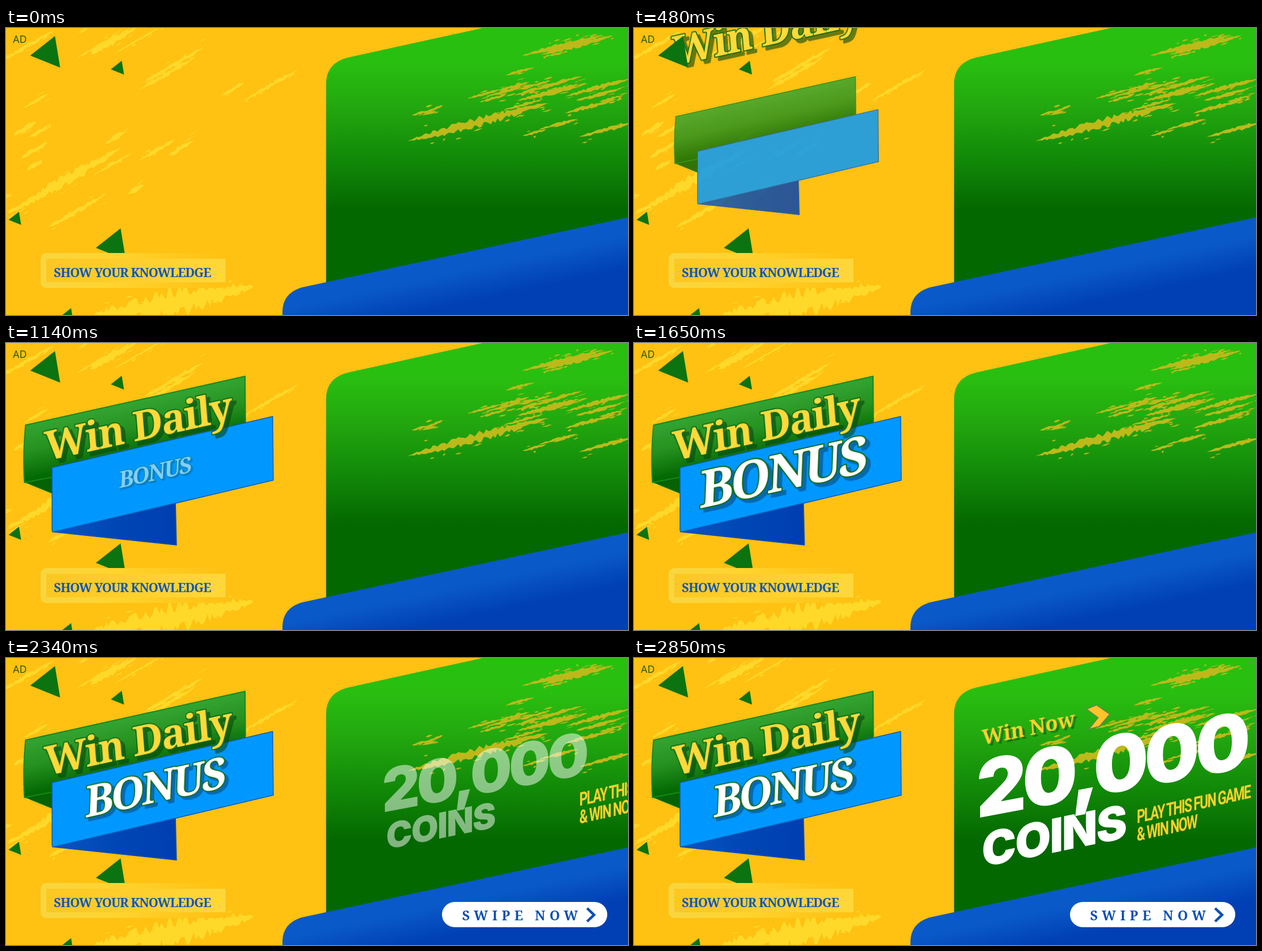
These frames come from a looping animation (1080x500 px, 3520 ms). An HTML page:

```html
<!DOCTYPE html>
<html lang="en">
<head>
<meta charset="utf-8">
<title>Win Daily Bonus</title>
<style>
html, body { margin: 0; width: 100%; height: 100%; overflow: hidden; background: #ffc112; }
svg { display: block; width: 100%; height: 100%; }
.slab { font-family: "Noto Serif", "DejaVu Serif", serif; font-weight: 700; }
.heavy { font-family: Inter, "Open Sans", sans-serif; font-weight: 900; fill: #fff; }
.mid { text-anchor: middle; }
.edge { stroke: #0b6a12; stroke-width: 3.5px; stroke-linejoin: round; paint-order: stroke; }
#title { font-size: 70px; letter-spacing: -2px; fill: #ffd93a; filter: drop-shadow(6px 7px 0 #07480f99); }
#bonus text { font-size: 76px; letter-spacing: -5px; fill: #fff; filter: drop-shadow(6px 6px 0 #0a4a7a99); }
#winNow text { font-size: 36px; letter-spacing: -.1px; fill: #ffd030; filter: drop-shadow(4px 4px 0 #0a560a99); }
#play { font: 700 23px Roboto, "Open Sans", sans-serif; letter-spacing: -1.7px; fill: #ffd02c; }
</style>
</head>
<body>
<svg viewBox="0 0 1080 500" preserveAspectRatio="none">
  <defs>
    <linearGradient id="panelFill" gradientUnits="userSpaceOnUse" x1="0" y1="0" x2="0" y2="330">
      <stop offset=".18" stop-color="#29bf10"/><stop offset=".42" stop-color="#22a70f"/>
      <stop offset=".7" stop-color="#118808"/><stop offset=".96" stop-color="#046800"/>
    </linearGradient>
    <linearGradient id="blueFill" gradientUnits="userSpaceOnUse" x1="700" y1="412" x2="718" y2="496">
      <stop offset=".35" stop-color="#0a59c8"/><stop offset="1" stop-color="#0040b4"/>
    </linearGradient>
    <linearGradient id="ribbonFill" gradientUnits="userSpaceOnUse" x1="240" y1="97" x2="260" y2="187">
      <stop offset="0" stop-color="#33a432"/><stop offset=".5" stop-color="#26911f"/>
      <stop offset="1" stop-color="#046a04"/>
    </linearGradient>
    <linearGradient id="foldFill">
      <stop offset="0" stop-color="#0a55c4"/><stop offset=".5" stop-color="#0046b4"/>
      <stop offset="1" stop-color="#003eb2"/>
    </linearGradient>
    <linearGradient id="labelFill">
      <stop offset="0" stop-color="#f8d640"/><stop offset=".4" stop-color="#ffd42e"/>
      <stop offset="1" stop-color="#ffd02c" stop-opacity="0"/>
    </linearGradient>
    <linearGradient id="labelInner">
      <stop offset="0" stop-color="#fcc722"/><stop offset="1" stop-color="#ffd73a"/>
    </linearGradient>
    <clipPath id="panelClip"><path id="panelShape" d="M555.500 500V97Q556 60 595 51L845 -4H1080V500Z"/></clipPath>
  </defs>

  <rect width="1080" height="500" fill="#ffc112"/>
  <path id="paint" fill="#ffd92a"/>

  <g clip-path="url(#panelClip)">
    <use href="#panelShape" fill="url(#panelFill)"/>
    <path id="splash" fill="#bdb91a"/>
    <g id="winNow">
      <text class="slab mid" transform="matrix(.98 -.2 .08 1 686 135)">Win Now</text>
      <path d="M786 89L803 82L826 98L808 119L790 124L806 104Z" fill="#ffc42a" stroke="#6f7a5a" stroke-width="1.5"/>
    </g>
    <g id="prize" class="heavy mid">
      <text transform="matrix(.98 -.185 0 1 829 235)" font-size="137" letter-spacing="-7">20,000</text>
      <text transform="matrix(.98 -.2 0 1 729 339)" font-size="82" letter-spacing="-2.2">COINS</text>
    </g>
    <g id="play">
      <text transform="matrix(.98 -.22 0 1.42 873 288)">PLAY THIS FUN GAME</text>
      <text transform="matrix(.98 -.22 0 1.42 873 319)">&amp; WIN NOW</text>
    </g>
  </g>
  <path d="M480 500V492Q482 459 518 451L1080 330V500Z" fill="url(#blueFill)"/>

  <g id="ribbon" stroke-linejoin="round">
    <path d="M31 242L80 225V262Z" fill="#056205" stroke="#148a14"/>
    <path d="M34 143L415 58L416 170L32 243Q29 195 34 143Z" fill="url(#ribbonFill)" stroke="#148a14" stroke-width="2"/>
    <path d="M81 329L294 270L296 352Z" fill="url(#foldFill)" stroke="#0a4fb8" stroke-width="1.5"/>
    <path d="M80 217L463 128L464 239L83 329Q80 330 80 325Z" fill="#0098ff" stroke="#0b58b8" stroke-width="1.5"/>
  </g>
  <g id="drop"><text id="title" class="slab mid edge" transform="matrix(.977 -.215 .08 1 231 170)">Win Daily</text></g>
  <g id="bonus"><text class="slab mid edge" transform="matrix(.977 -.215 -.04 1 257 252)">BONUS</text></g>

  <path id="triangles" fill="#0b7310"/>
  <rect x="60" y="392" width="321" height="61" rx="10" fill="#ffc112"/>
  <rect x="60" y="392" width="321" height="61" rx="10" fill="url(#labelFill)"/>
  <rect x="70" y="402" width="311" height="41" fill="url(#labelInner)"/>
  <text class="slab" x="83" y="434" font-size="21.5" letter-spacing="-.95" fill="#0a55c0">SHOW YOUR KNOWLEDGE</text>
  <text x="12" y="26" font-size="17.5" font-family="Noto Sans, Open Sans, sans-serif" fill="#2b5c10">AD</text>

  <g id="pill">
    <rect x="757" y="425" width="287" height="44" rx="22" fill="#fff"/>
    <text class="slab" x="792" y="457" font-size="23" letter-spacing="7.3" fill="#0a4fb8">SWIPE NOW</text>
    <path d="M1009 436L1021 447.500L1009 459" fill="none" stroke="#0a4fb8" stroke-width="4.500"/>
  </g>
</svg>
<script>
const el = id => document.getElementById(id);

let seed = 11;
const rand = () => (seed = seed * 16807 % 2147483647) / 2147483647;
const spread = () => rand() + rand() - 1;

// Ragged brush stroke, tapered at both ends
function stroke(x, y, dx, slope, w) {
  const n = Math.max(3, Math.round(dx / 4)), top = [], bottom = [];
  for (let i = 0; i <= n; i++) {
    const u = i / n, r = w / 2 * Math.sin(Math.PI * u) ** .7;
    const at = o => (x + dx * u).toFixed(1) + ' ' + (y + slope * dx * u + o).toFixed(1);
    top.push(at(-r * (.3 + rand())));
    bottom.unshift(at(r * (.3 + rand())));
  }
  return 'M' + top.concat(bottom).join('L') + 'Z';
}

// A stroke with small flecks scattered around it
function brush(x, y, dx, slope, w) {
  let d = stroke(x, y, dx, slope, w);
  for (let i = 0; i < dx / 14; i++) {
    const at = dx * rand();
    d += stroke(x + at, y + slope * at + spread() * (w + 6), 4 + rand() * 14, slope, 1 + rand() * 3);
  }
  return d;
}

// Broad strokes: the long diagonal on the left and the patch at the bottom
let paint = brush(0, 325, 200, -.58, 20) + brush(130, 510, 300, -.2, 44);
for (let i = 0; i < 28; i++) {
  const x = rand() * 540 - 20, y = 30 + rand() * 390 - .6 * x;
  paint += brush(x, y, 25 + rand() * 80, -.58, 4 + rand() * 9);
}
el('paint').setAttribute('d', paint);

// The panel's strokes follow one band and grow longer toward the right
let splash = brush(697, 197, 245, -.27, 16);
for (let i = 0; i < 24; i++) {
  const x = 650 + 400 * Math.sqrt(rand()), y = 190 + 130 * spread() - .28 * (x - 700);
  const dx = 25 + rand() * (x - 640) * .4;
  splash += brush(x, y, dx, -.27, 3 + dx * .05);
}
el('splash').setAttribute('d', splash);

el('triangles').setAttribute('d', [[85, 14, 1], [201, 57, .44], [22.5, 320, .42], [199, 349, 1], [113, 488, .42]]
  .map(([x, y, s]) => `M${x} ${y}l${-43 * s} ${34 * s}l${52 * s} ${21 * s}Z`).join(''));

const ramp = (t, a, b) => Math.min(1, Math.max(0, (t - a) / (b - a)));
const slide = (id, x, y) => el(id).setAttribute('transform', `translate(${x} ${y})`);
function pop(id, cx, cy, scale, alpha) {
  el(id).setAttribute('transform', `translate(${cx} ${cy}) scale(${scale}) translate(${-cx} ${-cy})`);
  el(id).setAttribute('opacity', Math.min(1, alpha));
}

const LOOP = 3520, STEP = 30, END = 2850;

function draw(t) {
  const ribbon = ramp(t, 30, 580);
  pop('ribbon', 247, 205, ribbon, ribbon);

  slide('drop', 0, -.47 * Math.max(0, 777 - t));

  const bonus = 1.31 * ramp(t, 750, 1740) - .31 * ramp(t, 1740, 2100);
  pop('bonus', 259, 226, bonus, bonus);

  const pill = 1.17 * ramp(t, 1650, 1950) - .17 * ramp(t, 1950, 2150);
  pop('pill', 900.5, 447, pill, pill);

  const prize = ramp(t, 1830, END);
  pop('prize', 833, 238, .51 + .49 * prize, prize);

  const right = 245 * (1 - prize);
  slide('play', right, -.246 * right);

  const left = .7 * (END - t);
  slide('winNow', -left, .246 * left);
}

const start = performance.now();
function tick() {
  const t = (performance.now() - start) % LOOP;
  draw(Math.min(END, Math.floor(t / STEP) * STEP));
  requestAnimationFrame(tick);
}
tick();
</script>
</body>
</html>
```
